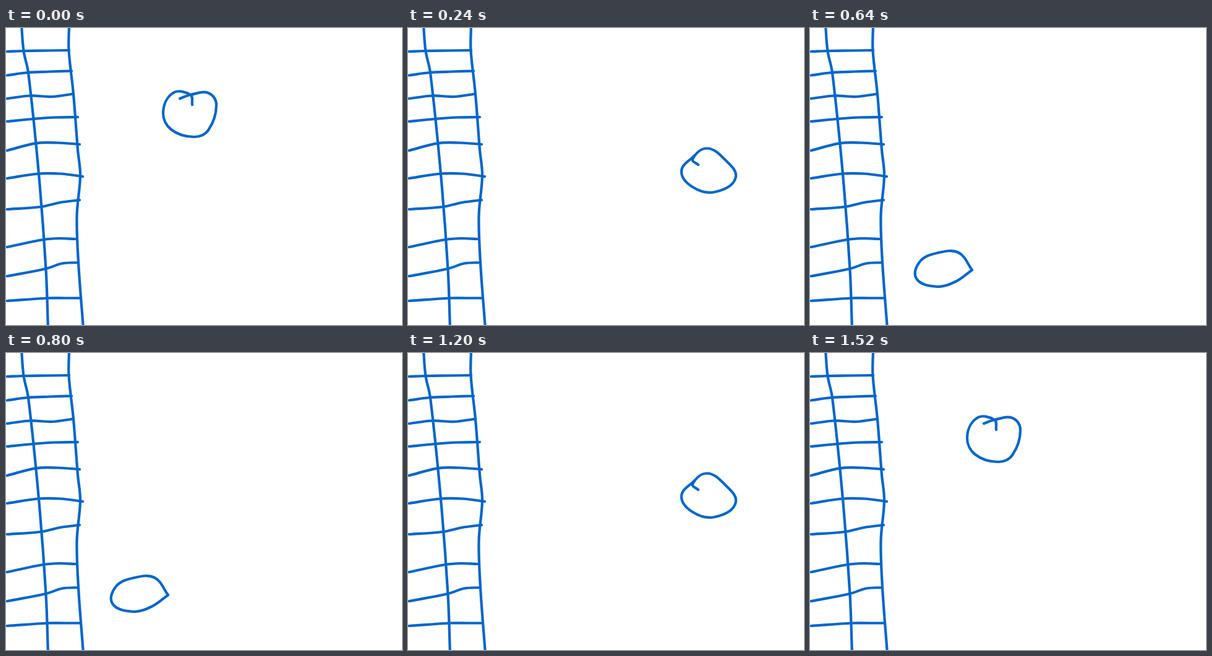
Recreate the animation shown at these times as an HTML page. Size 640 by 480 pixels, loop 1600 ms.

```html
<!DOCTYPE html>
<html lang="en">
<head>
<meta charset="utf-8">
<title>Bouncing ball</title>
<style>
  html, body { margin: 0; width: 100%; height: 100%; overflow: hidden; background: #fff; }
  svg { display: block; width: 640px; height: 480px; }
  path { fill: none; stroke: #06c; stroke-width: 4.2; stroke-linecap: round; stroke-linejoin: round; }
</style>
</head>
<body>
<svg viewBox="0 0 640 480">
  <g id="ladder"></g>
  <path id="ball"/>
</svg>
<script>
const STEP = 80, COUNT = 20, WALL = 9;

const rails = [
  '25,-5 28.5,37 36,72 53,236 64.5,390 68,486',
  '102,-5 101.5,36 109,107 116,197 120,238 114.5,304 117,379 125,486'
];

// Height at the left edge, at the left rail, halfway on and at the end; x of the end.
const rungs = [
  [38, 37, 36.5, 36, 102],
  [76.5, 72, 70.5, 69.5, 106],
  [114, 109.5, 111, 106.5, 109],
  [151, 147, 144.5, 144, 116],
  [198, 186.3, 185.5, 188, 119],
  [243, 235.5, 235.5, 240, 124],
  [293, 289, 282, 278, 119],
  [354, 342, 340, 341, 112],
  [401, 389, 380.5, 379, 117],
  [441, 436.5, 436.5, 436.5, 121]
];

// Hand-drawn outlines at the main moments of the flight.
const sketches = {
  0: '281,114 298,108 327,105 340,124 327,165 304,176 267,164 254,136 270,105 298,108 301,124',
  3: '469,221 460,212 483,194.5 511,211.5 529.5,242 496,265 460,257 442,231 463,206',
  6: '347,358 352,349 372,348.5 394,360 409.5,393 399,413 368,416 337,391 346,362 368,349.5',
  8: '262,391 240,363 206,363.5 178,377 172,405 205,418 236,409.5 262,391'
};

const parse = text => text.split(' ').map(p => p.split(',').map(Number));

// Smooth path: each handle runs parallel to the line between its neighbours.
function smooth(pts) {
  const at = i => pts[Math.max(0, Math.min(pts.length - 1, i))];
  const handle = (from, to, p, reach) => {
    const dx = to[0] - from[0], dy = to[1] - from[1];
    const k = reach / Math.hypot(dx, dy);
    return [p[0] + dx * k, p[1] + dy * k];
  };
  let d = 'M' + pts[0];
  for (let i = 0; i < pts.length - 1; i++) {
    const [a, b, c, e] = [at(i - 1), at(i), at(i + 1), at(i + 2)];
    const reach = 0.35 * Math.hypot(c[0] - b[0], c[1] - b[1]);
    d += `C${handle(a, c, b, reach)} ${handle(e, b, c, reach)} ${c}`;
  }
  return d;
}

function rung([left, post, half, right, end], i) {
  const x = 31 + 4.2 * i;
  return [[2, left], [x, post], [(x + end) / 2, half], [end, right]];
}

// Falls in an arc from the top, then flies left until the ladder stops it.
function center(s) {
  const u = Math.max(0, Math.min(1, (s - 0.7) / 5.8));
  return [
    Math.max(160, 490 - 28 * Math.abs(s - 3.4) ** 1.5),
    135 + 255 * u * u * (3 - 2 * u)
  ];
}

// Wobbly ring whose ends overlap a little.
function blob(s) {
  const [cx, cy] = center(s);
  const pts = [];
  for (let i = 0; i <= 9; i++) {
    const a = i * Math.PI / 4 - 2;
    const r = 1 + 0.04 * Math.sin(2 * a + s * 5) + 0.03 * Math.sin(3 * a + s * 3) - 0.008 * i;
    pts.push([cx + 43 * r * Math.cos(a), cy + 40 * r * Math.sin(a)]);
  }
  return pts;
}

const outline = s => smooth(sketches[s] ? parse(sketches[s]) : blob(s));

// Out to the ladder and back, slowing down just before the start.
const place = i => i < 2 * WALL ? WALL - Math.abs(WALL - i) : 0.4 * (COUNT - 1 - i);

const ladder = document.getElementById('ladder');
for (const line of [...rails.map(parse), ...rungs.map(rung)]) {
  const path = document.createElementNS('http://www.w3.org/2000/svg', 'path');
  path.setAttribute('d', smooth(line));
  ladder.append(path);
}

const ball = document.getElementById('ball');
const outlines = Array.from({ length: COUNT }, (_, i) => outline(place(i)));

function tick() {
  const i = Math.floor(performance.now() / STEP) % COUNT;
  ball.setAttribute('d', outlines[i]);
  requestAnimationFrame(tick);
}
tick();
</script>
</body>
</html>
```
